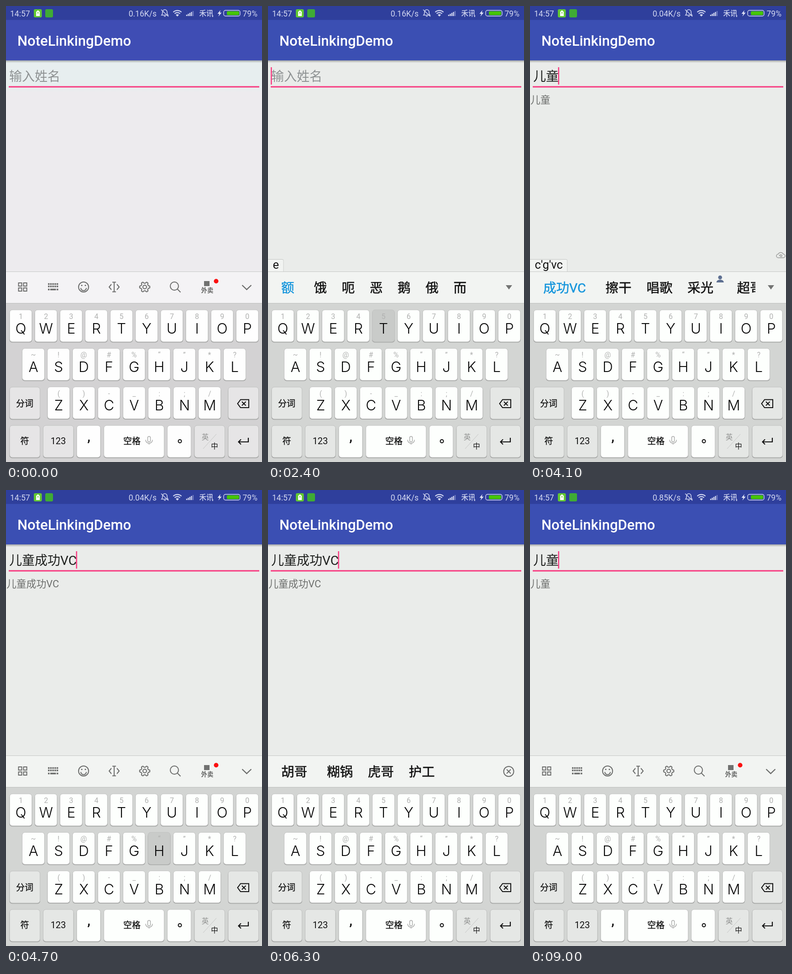
An HTML page for the animation above (9.5 s loop, 561 px wide and 998 px high).

```html
<!DOCTYPE html>
<html lang="zh-CN">
<head>
<meta charset="utf-8">
<title>Form demo</title>
<style>
  html, body { margin: 0; width: 100%; height: 100%; overflow: hidden; }
  svg {
    display: block; width: 100vw; height: 100vh;
    --page: #eaecea; --page-top: #eaecea; --bar: #f2f4f2; --board: #d3d5d3;
    --key: #fdfffd; --fn: #e5e7e5; --head: #3b4fb3; --status: #2f3f9c;
    font-family: Roboto, "Noto Sans CJK SC", "Noto Sans CJK", sans-serif;
  }
  svg.warm {
    --page: #edebee; --page-top: #e7eeef; --bar: #f4f3f5; --board: #d3d2d3;
    --key: #fefefe; --fn: #e6e5e6; --head: #3f4db4; --status: #303f9c;
  }
  text { white-space: pre; }
  .mid { text-anchor: middle; }
  .status { fill: #d3d8f1; font-size: 17.5px; }
  .key rect { fill: var(--key); stroke: #c0c1c0; stroke-width: 1; }
  .key.fn rect { fill: var(--fn); }
  .key .lip, .key.fn .lip { fill: #9c9d9c; stroke: none; }
  .key.down rect:not(.lip) { fill: #c9cbc9; }
  .cap { font: 300 31.5px Inter, "Liberation Sans", sans-serif; fill: #080808; }
  .alt { font-size: 16px; fill: #b0b1b0; }
  .word { font-size: 19px; fill: #111; stroke: #111; stroke-width: .3; }
  .line { fill: none; stroke: #6c6d6c; stroke-width: 2; }
  .dark { fill: none; stroke: #111; stroke-width: 2; }
  .cand { font-size: 28.5px; }
  .cand text { fill: #111; stroke: #111; stroke-width: .5; }
  .cand .first { fill: #1495dc; stroke: #1495dc; }
</style>
</head>
<body>
<svg id="stage" viewBox="0 0 561 998" preserveAspectRatio="none">
  <defs>
    <linearGradient id="tint" x1="0" y1="0" x2="0" y2="1">
      <stop offset="0" style="stop-color:var(--page-top)"/>
      <stop offset=".8" style="stop-color:var(--page-top)"/>
      <stop offset="1" style="stop-color:var(--page)"/>
    </linearGradient>
    <linearGradient id="shade" x1="0" y1="0" x2="0" y2="1">
      <stop offset="0" stop-opacity=".32"/>
      <stop offset="1" stop-opacity="0"/>
    </linearGradient>
    <clipPath id="candClip"><rect y="582" width="494" height="68"/></clipPath>
    <clipPath id="tabClip"><rect id="tabBox" y="553" width="35" height="28"/></clipPath>
  </defs>

  <rect width="561" height="998" style="fill:var(--page)"/>
  <rect y="118" width="561" height="72" fill="url(#tint)"/>
  <rect y="118.500" width="561" height="6" fill="url(#shade)"/>
  <rect width="561" height="119" style="fill:var(--head)"/>
  <rect width="561" height="30.500" style="fill:var(--status)"/>
  <text x="25" y="87" font-size="31" font-weight="500" fill="#fff">NoteLinkingDemo</text>

  <g class="status">
    <text x="9" y="22.500">14:57</text>
    <text id="speed" x="330" y="22.500" text-anchor="end"></text>
    <text x="423.500" y="22" font-size="15.500" stroke="#d3d8f1" stroke-width=".3">禾讯</text>
    <text x="518.500" y="22.500">79%</text>
  </g>
  <rect x="61" y="7" width="17.500" height="18" rx="3" fill="#62c832"/>
  <path d="M66 12h2v-2h4v2h2v10h-8z" fill="#fff"/>
  <path d="M68 15h4" stroke="#62c832" stroke-width="1.500"/>
  <rect x="86" y="7" width="17" height="18" rx="3" fill="#3fab35"/>
  <g fill="none" stroke="#d3d8f1" stroke-width="1.600">
    <path d="M341 20h14c-2-2-2-4-2-7a5 5 0 0 0-10 0c0 3 0 5-2 7zM346 22.500h4M340 8l16 15"/>
    <path d="M366.500 13.500a13 13 0 0 1 18 0M369.500 16.800a8.500 8.500 0 0 1 12 0" stroke-width="2.200"/>
  </g>
  <path d="M375.500 23l-3.500-3.500a5 5 0 0 1 7 0z" fill="#d3d8f1"/>
  <path d="M396 22v-3M399.500 22v-5M403 22v-7M406.500 22v-9" stroke="#d3d8f1" stroke-width="2.400"/>
  <path d="M410 22v-11" stroke="#6f7bc0" stroke-width="2.400"/>
  <path d="M470 9l-6.500 8h4l-2 6 7-8.500h-4z" fill="#e4e7f7"/>
  <rect x="477" y="9.500" width="36" height="12.500" rx="4" fill="none" stroke="#d3d8f1" stroke-width="1.400"/>
  <rect x="484" y="11.500" width="27" height="8.500" rx="2" fill="#45c508"/>

  <text id="field" x="7" y="164" font-size="28"></text>
  <rect x="6" y="175.400" width="549" height="3" fill="#f73a80"/>
  <rect id="caret" y="134" width="2.500" height="38" fill="#f73a80"/>
  <text id="echo" x="1" y="212.500" font-size="21.800" fill="#6d6f6d"></text>

  <g id="tab">
    <g clip-path="url(#tabClip)">
      <rect id="tabPaper" x="-4" y="554.500" height="34" rx="3" style="fill:var(--bar)" stroke="#c2c4c2"/>
      <text id="typed" x="10.500" y="575" font-size="25.500" fill="#111"></text>
    </g>
    <path id="cloud" class="line" style="stroke:#999a99;stroke-width:1.500"
      d="M544 551a4 4 0 0 1 0-8 6 6 0 0 1 11 0 4 4 0 0 1 0 8zM546 547c2-4 7-3 6 0s-5 1-3-1"/>
  </g>

  <rect y="581" width="561" height="70" style="fill:var(--bar)"/>
  <path d="M0 581.500h561" stroke="#c6c8c6"/>

  <g id="tools">
    <path class="line" d="M27.500 606h7v7h-7zM38.500 606h7v7h-7zM27.500 617h7v7h-7zM38.500 617h7v7h-7z"/>
    <path class="line" stroke-dasharray="3.500 1.200" style="stroke-width:3.500" d="M92 608.500h22.500M92 613.700h22.500"/>
    <path class="line" style="stroke-width:3.500" d="M92 620.500h3.500M97 620.500h12.500M111 620.500h3.500"/>
    <circle class="line" cx="170" cy="615" r="11"/>
    <path class="line" d="M164 617a6 6 0 0 0 12 0"/>
    <circle cx="166" cy="611.500" r="1.600" fill="#6c6d6c"/><circle cx="174" cy="611.500" r="1.600" fill="#6c6d6c"/>
    <path class="line" d="M231 609l-5 6 5 6M243 609l5 6-5 6M237 604.500v21M233 604.500h8M233 625.500h8"/>
    <path class="line" id="gear"/>
    <circle class="line" cx="304" cy="615" r="4"/>
    <circle class="line" cx="369" cy="613" r="9"/>
    <path class="line" d="M375.500 619.500l7 7"/>
    <rect x="434" y="602" width="12" height="11" fill="#707170"/>
    <text class="mid" x="441" y="627" font-size="13.500" font-weight="700" fill="#666766">外卖</text>
    <circle cx="460.500" cy="602.300" r="5" fill="#fb1010"/>
    <path class="line" style="stroke-width:2.400" d="M517.500 611l10 9.500 10-9.500"/>
  </g>
  <g id="picks">
    <g clip-path="url(#candClip)">
      <rect id="pickGlow" y="582" width="107" height="69" fill="#dadcda"/>
      <g id="cands" class="cand"></g>
    </g>
    <path id="more" d="M521 611h14l-7 9.500z" fill="#737473"/>
    <g id="close" class="line"><circle cx="527.500" cy="616" r="11"/><path d="M523 611.500l9 9m0-9l-9 9"/></g>
  </g>

  <rect y="650" width="561" height="348" style="fill:var(--board)"/>
  <path d="M0 650.500h561" stroke="#bcbebc"/>
  <g id="keys"></g>
  <g id="marks">
    <text class="word mid" x="41" y="876.500">分词</text>
    <text class="word mid" x="41" y="958.500">符</text>
    <text class="mid" x="114.500" y="959" font-size="20" fill="#111">123</text>
    <text class="mid" x="181.500" y="951.500" font-size="30" font-weight="500" fill="#111">,</text>
    <text class="word mid" x="276" y="958.500">空格</text>
    <rect class="line" style="stroke:#aaabaa;stroke-width:1.500" x="310.500" y="942" width="6" height="12" rx="3"/>
    <path class="line" style="stroke:#aaabaa;stroke-width:1.500" d="M306 949.500c0 10 15 10 15 0M313.500 957v3"/>
    <circle class="dark" cx="381" cy="952.500" r="3.500"/>
    <path d="M432 969l29-32" stroke="#c4c5c4"/>
    <text class="mid" x="436.500" y="949" font-size="15.500" fill="#8f908f">英</text>
    <text class="mid" x="457" y="968.500" font-size="15.500" font-weight="500" fill="#111">中</text>
    <path class="dark" d="M514 861.500h18v17.500h-18l-6.500-8.700zM517 866l8.500 8.500m0-8.500l-8.500 8.500"/>
    <path class="dark" style="stroke-width:2.200" d="M531 945v9h-21M515 948.500l-5.500 5.500 5.500 5.500"/>
  </g>
</svg>
<script>
const $ = id => document.getElementById(id);
const pen = document.createElement('canvas').getContext('2d');
const widthOf = (text, size) => {
  pen.font = size + 'px Roboto, "Noto Sans CJK SC", "Noto Sans CJK", sans-serif';
  return pen.measureText(text).width;
};
const show = (id, on) => { $(id).style.display = on ? '' : 'none'; };

// Keyboard
const PITCH = 55.15;
const key = (name, x, y, w, fn = '') =>
  `<g class="key ${fn}" id="key${name}"><rect class="lip" x="${x - .5}" y="${y + 2}" width="${w + 1}" height="69.500" rx="6"/>` +
  `<rect x="${x}" y="${y}" width="${w}" height="70" rx="6"/></g>`;
const row = (letters, alts, x, y) => [...letters].map((c, i) => {
  const left = x + i * PITCH, mid = left + 24.5;
  return key(c, left, y, 48.8) +
    `<text class="alt mid" x="${mid}" y="${y + 20}">${alts[i]}</text>` +
    `<text class="cap mid" x="${mid}" y="${y + 51.5}">${c}</text>`;
}).join('');
const plain = [['Comma', 155, 52], ['Space', 214.500, 132], ['Stop', 353.500, 52]];
const special = [['Split', 8, 834], ['Back', 487, 834], ['Sym', 8, 918], ['Num', 81.500, 918], ['Lang', 413, 918], ['Enter', 487, 918]];
$('keys').innerHTML =
  row('QWERTYUIOP', '1234567890', 8, 665) +
  row('ASDFGHJKL', '~!@#%“”*?', 35.500, 749.300) +
  row('ZXCVBNM', '()-_:;/', 91, 833.600) +
  plain.map(([n, x, w]) => key(n, x, 918, w)).join('') +
  special.map(([n, x, y]) => key(n, x, y, 66.500, 'fn')).join('');

const gear = [];
for (let i = 0; i < 72; i++) {
  const a = i * Math.PI / 36, r = 9.8 + 1.5 * Math.tanh(2.5 * Math.cos(6 * a));
  gear.push((304 + r * Math.cos(a)).toFixed(1) + ' ' + (615 + r * Math.sin(a)).toFixed(1));
}
$('gear').setAttribute('d', 'M' + gear.join('L') + 'Z');

// Each step changes only the named parts of the state.
const LOOP = 9500, KID = '儿童', WIN = KID + '成功VC';
const steps = [
  [0, { warm: 1, text: '', caret: 0, typed: '', tab: '', cands: '', live: 0, glow: 0, cloud: 0, down: '', speed: '0.16' }],
  [100, { caret: 1 }],
  [600, { caret: 0 }],
  [1100, { caret: 1 }],
  [1600, { caret: 0 }],
  [2100, { warm: 0, caret: 1, down: 'E' }],
  [2200, { typed: 'e', tab: 'e', cands: '额 饿 呃 恶 鹅 俄 而', live: 1 }],
  [2300, { down: '' }],
  [2400, { down: 'T' }],
  [2500, { typed: "e't", cands: '儿童 额头 恶徒 而同 二胎 耳听', down: '' }],
  [2600, { tab: "e't", caret: 0 }],
  [2800, { glow: 1 }],
  [2900, { text: KID, caret: 1, typed: '', glow: 0, live: 0, cands: '节 医院 节快乐 乐园 房 不宜' }],
  [3400, { caret: 0 }],
  [3500, { down: 'C' }],
  [3600, { typed: 'c', tab: 'c', live: 1, cands: '从 才 次 此 吃 车 出', down: '' }],
  [3700, { down: 'G' }],
  [3800, { typed: "c'g", tab: "c'g", cands: '成功 擦干 唱歌 采光* 超哥', down: 'V' }],
  [3900, { typed: "c'g'v", tab: "c'g'v", caret: 1, down: '' }],
  [4000, { down: 'C', speed: '0.04' }],
  [4100, { typed: "c'g'vc", tab: "c'g'vc", cands: '成功VC 擦干 唱歌 采光* 超哥', cloud: 1, down: '' }],
  [4300, { cloud: 0 }],
  [4400, { glow: 1 }],
  [4500, { text: WIN, typed: '', glow: 0, live: 0, cands: '', caret: 1 }],
  [4700, { down: 'H' }],
  [4800, { typed: 'h', tab: 'h', live: 1, cands: '和 会 好 还 后 很 或', down: '' }],
  [5000, { caret: 0 }],
  [5300, { typed: "hu'g", cands: '虎哥 hug 胡哥 糊锅 护工 护国' }],
  [5400, { tab: "hu'g", glow: 1 }],
  [5500, { text: WIN + '虎哥', typed: '', glow: 0, live: 0, cands: '', caret: 1 }],
  [5900, { down: 'Back' }],
  [6000, { text: WIN + '虎', down: '' }],
  [6100, { down: 'Back' }],
  [6200, { text: WIN, cands: '胡哥 糊锅 虎哥 护工', down: '' }],
  [6500, { down: 'Back' }],
  [6600, { text: WIN.slice(0, 5), cands: '' }],
  [6700, { text: WIN.slice(0, 4) }],
  [6900, { text: WIN.slice(0, 3) }],
  [7000, { text: KID }],
  [7100, { down: '' }],
  [7500, { caret: 0 }],
  [8000, { caret: 1, speed: '0.85' }],
  [8500, { caret: 0 }],
  [9000, { caret: 1 }]
];

// A star after a word marks an address book entry.
function candidates(list, live) {
  let x = 29, out = '';
  list.split(' ').forEach((item, i) => {
    const word = item.replace('*', ''), w = widthOf(word, 28.5);
    out += `<text x="${x}" y="627" class="${live && !i ? 'first' : ''}">${word}</text>`;
    x += w + (i ? 32.7 : 43);
    if (word !== item) {
      const c = x - 18;
      out += `<circle cx="${c}" cy="594" r="4.300" fill="#5d6f91"/><path d="M${c - 8} 605c0-8 16-8 16 0z" fill="#5d6f91"/>`;
      x += 19;
    }
  });
  return out;
}

function draw(s) {
  $('stage').classList.toggle('warm', !!s.warm);
  $('speed').textContent = s.speed + 'K/s';
  $('field').textContent = s.text || '输入姓名';
  $('field').setAttribute('fill', s.text ? '#1d1f1d' : '#8e9293');
  $('echo').textContent = s.text;
  show('caret', s.caret);
  $('caret').setAttribute('x', 6 + widthOf(s.text, 28) - (s.text ? .5 : 0));

  show('tab', s.typed);
  show('cloud', s.cloud);
  $('typed').textContent = s.typed;
  const tabW = widthOf(s.tab, 25.5) + 21;
  $('tabBox').setAttribute('width', tabW);
  $('tabPaper').setAttribute('width', (s.typed === s.tab ? tabW : widthOf(s.typed, 25.5) + 21) + 3.5);

  show('tools', !s.cands);
  show('picks', s.cands);
  show('more', s.live);
  show('close', !s.live);
  show('pickGlow', s.glow);
  $('pickGlow').setAttribute('width', widthOf(s.cands.split(' ')[0], 28.5) + 50);
  $('cands').innerHTML = s.cands ? candidates(s.cands, s.live) : '';

  document.querySelectorAll('.key.down').forEach(k => k.classList.remove('down'));
  if (s.down) $('key' + s.down).classList.add('down');
}

let last = -1, start = performance.now();
function tick(now) {
  const t = Math.max(0, now - start) % LOOP;
  const passed = steps.filter(([at]) => at <= t);
  if (passed.length !== last) {
    last = passed.length;
    draw(Object.assign({}, ...passed.map(p => p[1])));
  }
  requestAnimationFrame(tick);
}
tick(start);
</script>
</body>
</html>
```
